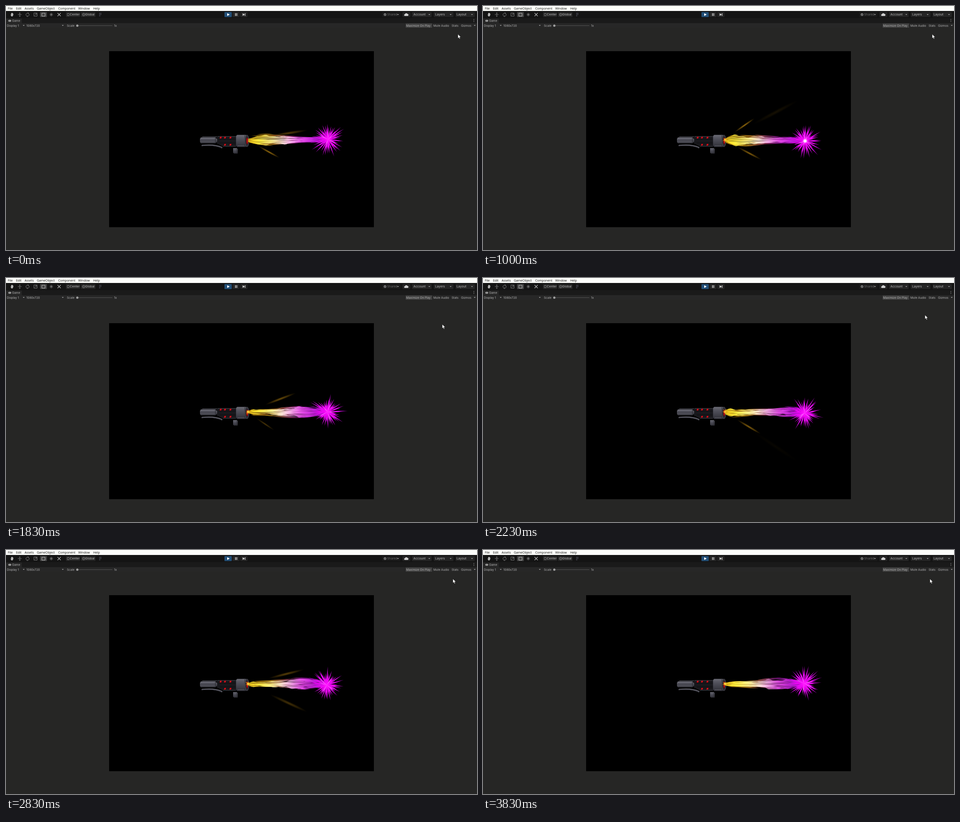
Animation, 1037 px wide and 540 px high, one loop 3860 ms. Source, as an HTML page:

```html
<!DOCTYPE html>
<html lang="en">
<head>
<meta charset="utf-8">
<title>Flame beam preview</title>
<style>
  html, body { margin: 0; width: 100%; height: 100%; overflow: hidden; background: #262625; }
  svg { display: block; width: 100%; height: 100%; }
  text { font-family: Inter, "Liberation Sans", sans-serif; font-size: 6.4px; fill: #b0b0b0; }
  .menu text { font-family: "Open Sans", "Noto Sans", sans-serif; font-size: 6.8px; fill: #111; }
  .tools text { font-size: 6.8px; fill: #bcbcbc; }
  .icon { fill: none; stroke: #8c8c8c; stroke-width: .8; }
</style>
</head>
<body>
<svg viewBox="0 0 1037 540" preserveAspectRatio="none">
  <defs>
    <linearGradient id="hot" gradientUnits="userSpaceOnUse" x1="532" x2="712" y1="0" y2="0">
      <stop offset="0" stop-color="#ffd418"/>
      <stop offset=".14" stop-color="#fff040"/>
      <stop offset=".3" stop-color="#fff494"/>
      <stop offset=".42" stop-color="#ffe8dc"/>
      <stop offset=".52" stop-color="#fbb4ee"/>
      <stop offset=".66" stop-color="#ea50ec"/>
      <stop offset=".82" stop-color="#c01cd8"/>
      <stop offset="1" stop-color="#9a00b8"/>
    </linearGradient>
    <linearGradient id="rim" gradientUnits="userSpaceOnUse" x1="532" x2="712" y1="0" y2="0">
      <stop offset="0" stop-color="#c08a00"/>
      <stop offset=".28" stop-color="#d8a01c"/>
      <stop offset=".45" stop-color="#b85c60"/>
      <stop offset=".65" stop-color="#b01cba"/>
      <stop offset="1" stop-color="#68008a"/>
    </linearGradient>
    <linearGradient id="shade" gradientUnits="userSpaceOnUse" x1="532" x2="712" y1="0" y2="0">
      <stop offset="0" stop-color="#8a5800"/>
      <stop offset=".4" stop-color="#702810"/>
      <stop offset=".6" stop-color="#640c60"/>
      <stop offset="1" stop-color="#200030"/>
    </linearGradient>
    <radialGradient id="burstFill" gradientUnits="userSpaceOnUse" cx="0" cy="0" r="46">
      <stop offset="0" stop-color="#f808fc"/>
      <stop offset=".6" stop-color="#dc08ea"/>
      <stop offset="1" stop-color="#8208a0"/>
    </radialGradient>
    <radialGradient id="core">
      <stop offset="0" stop-color="#ff1cff"/>
      <stop offset=".55" stop-color="#f408f8"/>
      <stop offset="1" stop-color="#e800f0" stop-opacity="0"/>
    </radialGradient>
    <radialGradient id="flash">
      <stop offset="0" stop-color="#fff"/>
      <stop offset=".4" stop-color="#fff" stop-opacity=".9"/>
      <stop offset="1" stop-color="#ff90ff" stop-opacity="0"/>
    </radialGradient>
    <radialGradient id="gold">
      <stop offset="0" stop-color="#b58210"/>
      <stop offset=".5" stop-color="#86600a" stop-opacity=".7"/>
      <stop offset="1" stop-color="#6a4800" stop-opacity="0"/>
    </radialGradient>
    <linearGradient id="metal" x2="0" y2="1">
      <stop offset="0" stop-color="#686872"/>
      <stop offset=".35" stop-color="#50505a"/>
      <stop offset="1" stop-color="#303038"/>
    </linearGradient>
  </defs>

  <rect width="1037" height="540" fill="#262625"/>
  <rect width="1037" height="11" fill="#fcfdfa"/>
  <rect y="11" width="1037" height="16.5" fill="#141414"/>
  <rect y="27.5" width="1037" height="10.5" fill="#1a1a1a"/>
  <rect y="28" width="35" height="10" fill="#262626"/>
  <rect y="38" width="1037" height="10.5" fill="#272727"/>
  <rect x="880" y="38.5" width="58" height="9.5" fill="#424242"/>
  <g id="menu" class="menu"></g>

  <g class="tools">
    <g id="buttons"></g>
    <path d="M10 19l1 .2.3-3.2h.9l.4-1h1l.4.7h.9l.4 1h.8v3l-1.600 3.300h-2.800z" fill="#b4b4b4"/>
    <g class="icon">
      <path d="M26 19h8.500M30.300 15v8.500M28.800 16.300l1.500-1.500 1.500 1.500M28.800 22l1.500 1.500 1.500-1.500"/>
      <path d="M44.500 21.500a3.700 3.700 0 0 1 4.500-5.500M50.500 17a3.700 3.700 0 0 1-4.500 5.500M48 14.500l2 1.500-2 1.500M47.500 21l-2 1.500 2 1.500"/>
      <path d="M61.500 15.500h7v7h-7zM63.500 20.500l3.500-3.500M65 17h2v2"/>
      <path d="M79 16h7v6.500h-7z" stroke="#d0d0d0"/>
      <path d="M96 19h7.500M99.700 15v8M97 16.300l5.400 5.400M102.400 16.300l-5.400 5.400"/>
      <path d="M113.500 15.500l7 7M120.500 15.500l-7 7" stroke="#b4b4b4" stroke-width="1.200"/>
      <path d="M135 16.500h4v5h-4z"/>
      <circle cx="171" cy="19" r="3"/><path d="M168 19h6M171 16v6" stroke-width=".5"/>
      <path d="M205 16h5M205 19h5M205 22h3M206 15v8M209 15v5" stroke="#4c4c58"/>
    </g>
    <path d="M487 16l5.500 3-5.500 3z" fill="#fff"/>
    <path d="M504.500 16h1.500v6h-1.500zM507.500 16h1.500v6h-1.500z" fill="#d6d6d6"/>
    <path d="M521 16l4.500 3-4.500 3zM525.700 16h1.300v6h-1.300z" fill="#d6d6d6"/>
    <circle cx="834.5" cy="19" r="3" fill="#777"/>
    <path d="M833 19l1.200 1.200 2-2.400" class="icon" style="stroke:#222"/>
    <path d="M878.500 22a2 2 0 0 1 0-4 3 3 0 0 1 5.500-.5 2.300 2.300 0 0 1 .5 4.500z" fill="#d0d0d0"/>
  </g>
  <g id="labels"></g>
  <g id="arrows" fill="#a0a0a0"></g>
  <rect x="5" y="30.8" width="6.500" height="4" rx="2" fill="#b0b0b0"/>
  <path d="M6.500 32.800h1.600M9 32.800h1" stroke="#262626" stroke-width=".9"/>
  <path d="M1029.500 29.500h1.200M1029.500 32h1.200M1029.500 34.500h1.200" stroke="#bbb" stroke-width="1.200"/>
  <path d="M158 43.500h76" stroke="#585858" stroke-width=".9"/>
  <circle cx="157" cy="43.5" r="2.500" fill="#a0a0a0"/>

  <rect x="227" y="100" width="583" height="389.5" fill="#000"/>

  <g id="gun">
    <path d="M432 289.500h37" stroke="#4c4c55" stroke-width="1.600"/>
    <path d="M432 308.800q28-3 43 4.500" fill="none" stroke="#5c5c66" stroke-width="3" stroke-linecap="round"/>
    <path d="M432 309.700q27-2 42 4.200" fill="none" stroke="#1c1c22" stroke-width="1.100"/>
    <path d="M464 288h44v23h-30l-14-7z" fill="#18181c"/>
    <path d="M466 288.600h40M478 310.500h28" stroke="#44444c"/>
    <path d="M468 294.500h38M470 303h36" stroke="#0c0c0f" stroke-width="1.200"/>
    <path d="M429 291h32l4 4v5l-4 4h-32l-2-3v-7z" fill="url(#metal)"/>
    <path d="M429 292.200h31M428 301h34" stroke="#7c7c86" stroke-width=".8"/>
    <path d="M428 302.500h33M461 292v11" stroke="#222228" stroke-width=".9"/>
    <path id="marks" fill="#e01420" stroke="#400408" stroke-width=".5"/>
    <path d="M509 285h19l2 3v21l-2 3h-19l-3-3v-21z" fill="url(#metal)" stroke="#141418" stroke-width=".8"/>
    <path d="M509 287h18M510 309.500h17" stroke="#74747e" stroke-width=".7"/>
    <path d="M526 286v25" stroke="#222228"/>
    <ellipse cx="530.500" cy="298.500" rx="4.500" ry="13" fill="#2c2c33" stroke="#5c5c66" stroke-width=".8"/>
    <ellipse cx="531" cy="298.500" rx="1.800" ry="7.500" fill="#d8141c" stroke="#400006"/>
    <path d="M500 314.500h8l2 2v10h-8l-2-2z" fill="url(#metal)"/>
    <path d="M508 316v10" stroke="#26262c"/>
  </g>

  <g id="rays" fill="url(#gold)"></g>
  <path id="wisps" fill="url(#rim)" opacity=".7"/>
  <path id="body" fill="url(#hot)" opacity=".72"/>
  <path id="dark" fill="url(#shade)" opacity=".75"/>
  <path id="bright" fill="url(#hot)"/>
  <path id="spark" fill="#f09a10" transform="translate(533 296)"/>
  <circle id="sparkCore" cx="533" cy="296" r="2.600" fill="#ffd23c"/>
  <g id="burst">
    <path id="spikes" fill="url(#burstFill)"/>
    <circle r="12" fill="url(#core)"/>
    <path id="glints" fill="#ffc8ff" opacity=".8"/>
    <circle id="flashDot" r="6" fill="url(#flash)"/>
  </g>
  <path id="cursor" d="M0 0v9l2-1.800 1.500 3.300 1.500-.7-1.500-3.200h3z" fill="#fff" stroke="#111" stroke-width=".5"/>
</svg>

<script>
const $ = id => document.getElementById(id);
const LOOP = 3860, TAU = Math.PI * 2;
const clamp = (v, a = 0, b = 1) => Math.min(b, Math.max(a, v));
const rnd = (a, b = 0) => {
  const s = Math.sin(a * 127.1 + b * 311.7 + 4.3) * 43758.5453;
  return s - Math.floor(s);
};
const pt = (x, y) => x.toFixed(1) + ' ' + y.toFixed(1);

function make(tag, parent, attrs, text = '') {
  const el = document.createElementNS('http://www.w3.org/2000/svg', tag);
  for (const k in attrs) el.setAttribute(k, attrs[k]);
  el.textContent = text;
  parent.append(el);
  return el;
}
const label = (parent, x, y, s, fill) =>
  make('text', parent, fill ? { x, y, style: 'fill:' + fill } : { x, y }, s);

// Editor chrome
[[4, 'File'], [22, 'Edit'], [41, 'Assets'], [68, 'GameObject'], [115, 'Component'], [159, 'Window'], [192, 'Help']]
  .forEach(([x, s]) => label($('menu'), x, 7.6, s));
[[75, 15, '#424242'], [132, 31], [165, 32], [481, 16, '#235078'], [498.5, 15.5], [516, 15.5], [828, 40, '#1a1a1a'],
  [873, 17], [894, 43], [942, 43], [990, 42]].forEach(([x, width, fill = '#252525']) =>
  make('rect', $('buttons'), { x, y: 13.5, width, height: 11, rx: 1, fill }));
[[140.5, 'Center'], [174.5, 'Global'], [839, 'Shared', '#686868'], [897, 'Account'], [945, 'Layers'], [992, 'Layout']]
  .forEach(([x, s, c]) => label($('buttons'), x, 21.4, s, c));
label($('labels'), 13.5, 35.3, 'Game');
[[2, 'Display 1'], [45, '1080x720'], [134, 'Scale'], [238, '1x'], [881, 'Maximize On Play'],
  [941, 'Mute Audio'], [981, 'Stats'], [1002, 'Gizmos']].forEach(([x, s]) => label($('labels'), x, 45.5, s));
[[39, 43], [125, 43], [1032, 43], [863, 19], [932, 19], [979, 19], [1026, 19]].forEach(([x, y]) =>
  make('path', $('arrows'), { d: `M${x - 2} ${y - 1}h4l-2 2.3z` }));
$('marks').setAttribute('d', [[470, 289.3], [479.5, 289.3], [491.5, 289.3], [479.5, 305], [491.5, 305]]
  .map(([x, y]) => `M${x + 1.3} ${y}h3.800l-1 4h-4z`).join(''));

// Golden rays: birth time and angle
const RAY_LIFE = 450;
const rays = [[-54, 29], [-225, -9], [30, -28], [230, 32], [334, -25], [520, 22], [618, -28], [910, 28], [946, -35],
  [1090, -30], [1200, 24], [1310, -18], [1360, 33], [1673, -21], [1810, 34], [2140, 31], [2260, -30], [2350, 22],
  [2574, 25], [2628, -14], [2870, -27], [2990, 31], [3120, -20], [3260, 27], [3360, -32]]
  .map(([birth, angle]) => ({ birth, el: make('ellipse', $('rays'), { transform: `translate(530 296) rotate(${angle})` }) }));

function drawRays(t) {
  for (const { birth, el } of rays) {
    const age = (t - birth) / RAY_LIFE;
    const on = age >= 0 && age < 1;
    el.setAttribute('opacity', on ? (1 - age) ** 1.1 * clamp(age * 9) : 0);
    if (!on) continue;
    const near = 22 + 60 * age, far = 66 + 140 * age;
    el.setAttribute('cx', (near + far) / 2);
    el.setAttribute('rx', (far - near) / 2);
    el.setAttribute('ry', 2.2 + 3.2 * age);
  }
}

// Flame: swellings travel from the nozzle to the impact
const START = 533, END = 708, WAVE = 190, PERIOD = 333.3;
const ripple = (s, k) => .5 * Math.sin(s * .13 + k) + .3 * Math.sin(s * .31 + 2 * k) + .2 * Math.sin(s * .07 + 5 * k);
const halfWidth = (x, t) => (10.5 + 3.8 * Math.cos(TAU * ((x - 565) / WAVE - t / PERIOD))) *
  clamp((x - 530) / 16 + .2) * (1 - .5 * clamp((x - 665) / 45));
const axis = x => 297 - clamp((x - 620) / 90);

function flameBody(t) {
  const edge = side => {
    const list = [];
    for (let x = START; x <= END; x += 4) {
      const h = halfWidth(x, t) * (.66 + .3 * ripple(x - t * WAVE / PERIOD, side * 3));
      list.push(pt(x, axis(x) + side * h));
    }
    return list;
  };
  return 'M' + edge(-1).concat(edge(1).reverse()).join('L') + 'Z';
}

function streaks(t, count, seed, spread, thick, long) {
  let d = '';
  for (let i = 0; i < count; i++) {
    const p = rnd(i, seed) + t / 310, gen = Math.floor(p);
    const lane = (rnd(i + gen * 13, seed + 1) * 2 - 1) * spread;
    const len = long * (.5 + rnd(i, seed + 2));
    const a = START - 25 + (p - gen) * 190;
    const x0 = Math.max(START, a), x1 = Math.min(END - 2, a + len);
    if (x1 - x0 < 5) continue;
    const at = x => axis(x) + lane * halfWidth(x, t) + 1.6 * ripple(x - t * .5, i);
    const xm = (x0 + x1) / 2, w = thick * (.5 + rnd(i, seed + 3));
    d += `M${pt(x0, at(x0))}Q${pt(xm, at(xm) - w)} ${pt(x1, at(x1))}Q${pt(xm, at(xm) + w)} ${pt(x0, at(x0))}Z`;
  }
  return d;
}

// Needles around the origin, each reborn at a new angle and length
function needles(step, count, reach, width, seed) {
  let d = '';
  for (let i = 0; i < count; i++) {
    const p = step / 9 + rnd(i, seed), gen = Math.floor(p);
    const a = (i + rnd(i + gen * 7, seed + 1) * .9) / count * TAU;
    const r = reach * (.58 + .42 * rnd(i + gen * 11, seed + 2)) * (.75 + .25 * Math.sin(Math.PI * (p - gen)));
    const c = Math.cos(a), s = Math.sin(a), b = r * .45;
    d += `M0 0L${pt(c * b - s * width, s * b + c * width)}L${pt(c * r, s * r)}L${pt(c * b + s * width, s * b - c * width)}Z`;
  }
  return d;
}

const path = [[0, 995, 62.5], [150, 989, 62.5], [1620, 989, 62.5], [1830, 960.5, 102.5], [2000, 960.5, 102.5],
  [2230, 973, 82], [2720, 984, 64], [LOOP, 984, 64]];
function cursorAt(t) {
  const i = path.findIndex(k => k[0] > t), [t0, x0, y0] = path[i - 1], [t1, x1, y1] = path[i];
  const u = (t - t0) / (t1 - t0);
  return [x0 + (x1 - x0) * u, y0 + (y1 - y0) * u];
}

function draw(now) {
  const step = Math.floor((now % LOOP) * .03 + .2);
  const t = Math.min(step / .03, LOOP - 1);
  const setPath = (id, d) => $(id).setAttribute('d', d);
  drawRays(t);
  setPath('body', flameBody(t));
  setPath('wisps', streaks(t, 46, 3, 1.05, 2, 64));
  setPath('dark', streaks(t, 34, 21, .85, 1.3, 38));
  setPath('bright', streaks(t, 44, 47, .8, 1.7, 48));

  const swell = halfWidth(545, t);
  $('spark').setAttribute('opacity', t ? .9 : 0);
  $('sparkCore').setAttribute('opacity', t ? clamp(1.3 - swell / 20) : 0);
  setPath('spark', needles(step, 10, 8, .6, 80));

  const cx = 707.8 + 1.5 * Math.sin(step * 1.3 + .8), cy = 297 + 2 * Math.sin(step * .7 - 1.2);
  $('burst').setAttribute('transform', `translate(${pt(cx, cy)})`);
  setPath('spikes', needles(step, 40, 45, 1.2, 60));
  setPath('glints', needles(step, 5, 28, .5, 71));
  $('flashDot').setAttribute('opacity', clamp(Math.cos(TAU * t / 500) * clamp(t / 300)));
  $('cursor').setAttribute('transform', `translate(${pt(...cursorAt(t))})`);
}

let begin;
function tick(now) {
  begin ??= now;
  draw(now - begin);
  requestAnimationFrame(tick);
}
draw(0);
requestAnimationFrame(tick);
</script>
</body>
</html>
```
